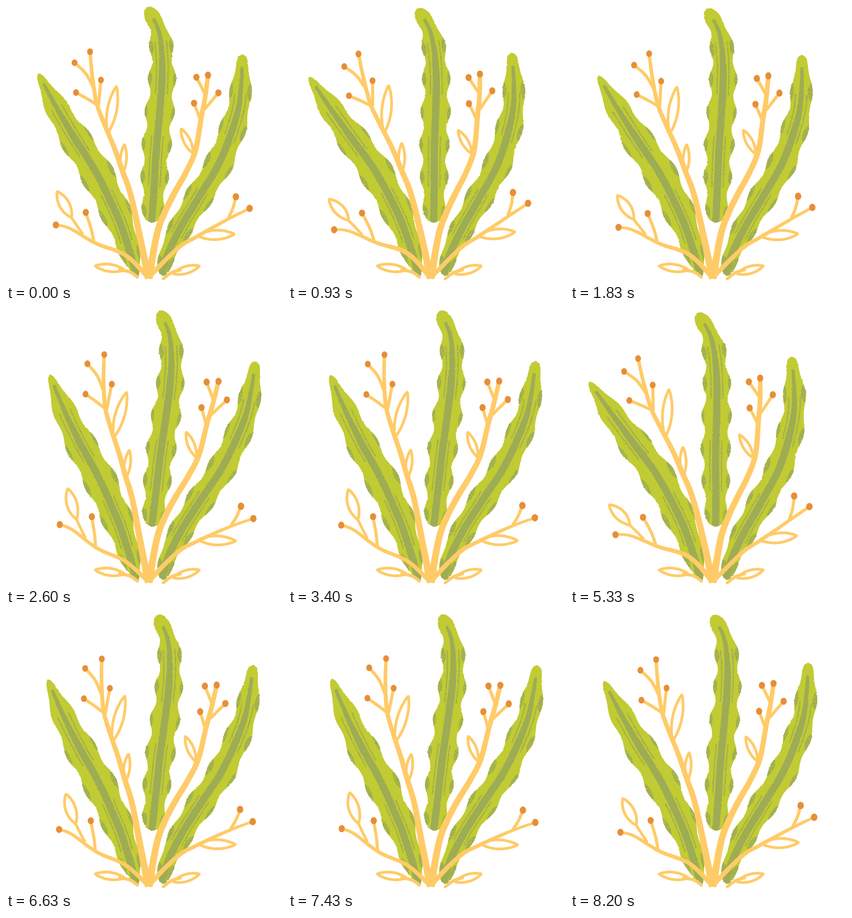
Write an HTML page that moves like this. It is 500 px wide and 500 px high and loops after 8.31 s.

```html
<!DOCTYPE html>
<html lang="en">
<head>
<meta charset="utf-8">
<title>Swaying plant</title>
<style>
  html, body { margin: 0; width: 100%; height: 100%; overflow: hidden; background: #fff; }
  svg { display: block; width: 100%; height: 100%; }
</style>
</head>
<body>
<svg id="stage" viewBox="0 0 500 500">
  <defs>
    <filter id="rough" filterUnits="userSpaceOnUse" x="0" y="0" width="500" height="500" color-interpolation-filters="sRGB">
      <feTurbulence type="fractalNoise" baseFrequency=".2" numOctaves="2" seed="4"/>
      <feDisplacementMap in="SourceGraphic" scale="2.5" xChannelSelector="R" yChannelSelector="G"/>
    </filter>
    <filter id="grain" filterUnits="userSpaceOnUse" x="0" y="0" width="500" height="500" color-interpolation-filters="sRGB">
      <feTurbulence type="fractalNoise" baseFrequency=".55" numOctaves="2" seed="9"/>
      <feColorMatrix values="0 0 0 0 0  0 0 0 0 0  0 0 0 0 0  6 0 0 0 -1.8"/>
      <feComposite in="SourceGraphic" operator="in"/>
    </filter>
  </defs>
</svg>
<script>
const LOOP = 8310, SWAY = LOOP / 2, HOLD = 130;
const GREEN = '#c1cb33', SHADE = '#9eac54', STEM = '#ffcb68', BERRY = '#e78e37';
const { PI, sin, cos, pow, floor, min, max, hypot } = Math;
const stage = document.getElementById('stage');
const updates = [];

let seed = 7;
const random = () => (seed = seed * 16807 % 2147483647) / 2147483647;

function add(tag, attrs, parent) {
  const el = document.createElementNS('http://www.w3.org/2000/svg', tag);
  for (const k in attrs) el.setAttribute(k, attrs[k]);
  parent.appendChild(el);
  return el;
}
const parse = text => text.split(' ').map(p => p.split(',').map(Number));
const fix = p => p[0].toFixed(2) + ' ' + p[1].toFixed(2);
const outline = (pts, closed) => 'M' + pts.map(fix).join('L') + (closed ? 'Z' : '');

// Catmull-Rom samples with normal n and share t of the arc length
function sample(text, count = 60) {
  const key = parse(text), last = key.length - 1;
  const at = i => key[max(0, min(last, i))];
  const pts = [];
  for (let k = 0; k <= count; k++) {
    const i = min(last - 1, floor(k / count * last)), f = k / count * last - i;
    const [a, b, c, d] = [at(i - 1), at(i), at(i + 1), at(i + 2)];
    pts.push([0, 1].map(j => b[j] + f / 2 * (c[j] - a[j] +
      f * (2 * a[j] - 5 * b[j] + 4 * c[j] - d[j] + f * (3 * (b[j] - c[j]) + d[j] - a[j])))));
  }
  let length = 0;
  const out = pts.map((p, k) => {
    const a = pts[max(0, k - 1)], b = pts[min(count, k + 1)], d = hypot(b[0] - a[0], b[1] - a[1]);
    if (k) length += hypot(p[0] - a[0], p[1] - a[1]);
    return { p, n: [(a[1] - b[1]) / d, (b[0] - a[0]) / d], s: length };
  });
  out.forEach(q => q.t = q.s / length);
  return out;
}
const shift = (q, d) => [q.p[0] + q.n[0] * d, q.p[1] + q.n[1] * d];

// Closed outline around a center line, half width from a function
const around = (line, half) => [
  ...line.map(q => shift(q, half(q))),
  ...line.map(q => shift(q, -half(q))).reverse()
];

// Bend around a fixed foot: amp is the tip travel, power 1 is a plain turn
function bend(foot, height, amp, px, power) {
  return ([x, y], s, dip) => {
    const u = max(0, (foot - y) / height);
    const turn = power * amp / height * pow(u, power - 1) * s;
    return [x + amp * s * pow(u, power), y + turn * (x - px) + 3 * dip * u];
  };
}

function shape(parent, warp, pts, attrs, closed = true) {
  const el = add('path', attrs, parent);
  updates.push((s, dip) => el.setAttribute('d', outline(pts.map(p => warp(p, s, dip)), closed)));
}
const stroke = (width, color) => ({ fill: 'none', stroke: color, 'stroke-width': width,
  'stroke-linecap': 'round', 'stroke-linejoin': 'round' });

function oval(cx, cy, rx, ry, nx, ny) {
  return Array.from({ length: 24 }, (_, i) => {
    const a = rx * cos(i * PI / 12), b = ry * sin(i * PI / 12);
    return [cx + a * nx - b * ny, cy + a * ny + b * nx];
  });
}

function leaf(id, o) {
  const line = sample(o.spine), end = line[line.length - 1].s;
  const { rise, fall } = o, peak = rise / (rise + fall);
  const swell = t => pow(t / peak, rise) * pow(max(0, 1 - t) / (1 - peak), fall);
  const half = q => swell(q.t) * (o.width + o.ripple * cos(2 * PI * (q.s - o.crest) / o.wave));
  const body = around(line, half);
  const clip = add('clipPath', { id }, stage.querySelector('defs'));
  shape(clip, o.warp, body, {});

  const g = add('g', { filter: 'url(#rough)' }, stage);
  shape(g, o.warp, body, { fill: GREEN });
  const inner = add('g', { 'clip-path': `url(#${id})` }, g);
  const soft = add('g', { filter: 'url(#grain)' }, inner);
  for (const side of [-1, 1]) {
    for (let s = o.crest; s < end; s += o.wave) {
      const q = line.find(q => q.s >= s), [x, y] = shift(q, side * half(q));
      shape(soft, o.warp, oval(x, y, 5 + 4 * random(), o.wave * .25, ...q.n), { fill: SHADE });
    }
    for (const from of [.16, .6]) {
      const to = from + .2 + .08 * random();
      const vein = line.filter(q => q.t > from && q.t < to).map(q => shift(q, side * 10.5));
      shape(soft, o.warp, vein, stroke(2.4, SHADE), false);
    }
  }
  const rib = line.filter(q => q.t > .05);
  shape(inner, o.warp, around(rib, q => 2 + 4.5 * min(1, q.t * 3)), { fill: SHADE });
}

// Each stalk and twig may end in a berry
function branch(o) {
  const g = add('g', {}, stage);
  const [w0, w1] = o.taper;
  shape(g, o.warp, around(sample(o.main), q => (w0 + (w1 - w0) * q.t) / 2), { fill: STEM });
  o.twigs.forEach(t => shape(g, o.warp, sample(t, 12).map(q => q.p), stroke(5.6, STEM), false));
  o.petals.forEach(([axis, width]) => shape(g, o.warp,
    around(sample(axis, 24), q => width / 2 * pow(max(0, sin(PI * q.t)), .75)), stroke(5, STEM)));
  if (!o.berry) return;
  [o.main, ...o.twigs].forEach(text => {
    const [x, y] = parse(text).pop();
    const el = add('ellipse', { rx: o.berry, ry: o.berry + .8, fill: BERRY }, g);
    updates.push((s, dip) => {
      const [cx, cy] = o.warp([x, y], s, dip);
      el.setAttribute('cx', cx.toFixed(2));
      el.setAttribute('cy', cy.toFixed(2));
    });
  });
}

leaf('left', {
  warp: bend(490, 368, 20.5, 100, 2),
  spine: '57,122 88,179 123,238 160,296 190,355 213,410 238,492',
  width: 28, rise: .6, fall: .55, ripple: 3.5, wave: 75, crest: 140
});
leaf('middle', {
  warp: bend(393, 391, 21.5, 264, 1),
  spine: '254,2 274,40 281,80 282,130 278,190 272,260 268,330 264,393',
  width: 24, rise: .35, fall: .25, ripple: 4, wave: 60, crest: 74
});
leaf('right', {
  warp: bend(485, 395, 23, 384, 2),
  spine: '427,87 425,145 417,200 388,280 350,345 316,402 292,452 283,489',
  width: 23.5, rise: .4, fall: .4, ripple: 3.2, wave: 70, crest: 65
});

branch({
  warp: bend(490, 407, 25, 168, 2),
  main: '258,494 245,430 226,343 210,297 195,255 176,210 163,174 155,125 151,83',
  taper: [13, 6], berry: 5.3,
  twigs: ['164,179 146,168 126,157', '167,178 171,134', '157,147 143,122 123,103'],
  petals: [['184,229 199,146', 17], ['211,302 214,251', 11]]
});
branch({
  warp: bend(490, 365, 18.5, 332, 2.3),
  main: '259,494 273,415 287,375 306,337 326,301 343,261 353,203 360,165 365,125',
  taper: [13, 8], berry: 5.6,
  twigs: ['360,186 384,157', '360,160 344,129', '352,207 340,176'],
  petals: [['338,266 317,223', 12]]
});
branch({
  warp: bend(490, 155, 19, 142, 2),
  main: '258,492 216,451 163,430 115,403 90,397',
  taper: [9, 5], berry: 5.6,
  twigs: ['159,427 154,404 144,374'],
  petals: [['118,383 92,337', 18], ['138,412 117,382', 0]]
});
branch({
  warp: bend(490, 145, 9, 338, 2),
  main: '258,492 311,439 345,418 400,387 441,366',
  taper: [9, 5], berry: 5.8,
  twigs: ['403,383 411,365 416,345'],
  petals: [['347,416 413,413', 17]]
});
for (const [tail, petal] of [['238,491 225,482 206,478', '214,478 162,471'], ['285,494 300,483 316,478', '303,485 350,471']])
  branch({ warp: p => p, main: tail, taper: [5, 5], twigs: [tail], petals: [[petal, 13]] });

// Quick swing right, slow swing back; halfway between linear and sine
const LOW_AT = 1220, RISE = 1630;
function lean(time) {
  const p = (time - LOW_AT + SWAY) % SWAY;
  const f = p < RISE ? p / RISE : (SWAY - p) / (SWAY - RISE);
  const eased = (f + (1 - cos(PI * f)) / 2) / 2;
  return -1.13 + 2.47 * eased;
}

let last = -1;
function draw(time) {
  const pose = floor(time / HOLD) * HOLD;
  if (pose === last) return;
  last = pose;
  const dip = max(0, cos(2 * PI * (pose - 1500) / SWAY));
  const s = lean(pose);
  updates.forEach(update => update(s, dip));
}

const start = performance.now();
function tick() {
  draw((performance.now() - start) % LOOP);
  requestAnimationFrame(tick);
}
tick();
</script>
</body>
</html>
```
